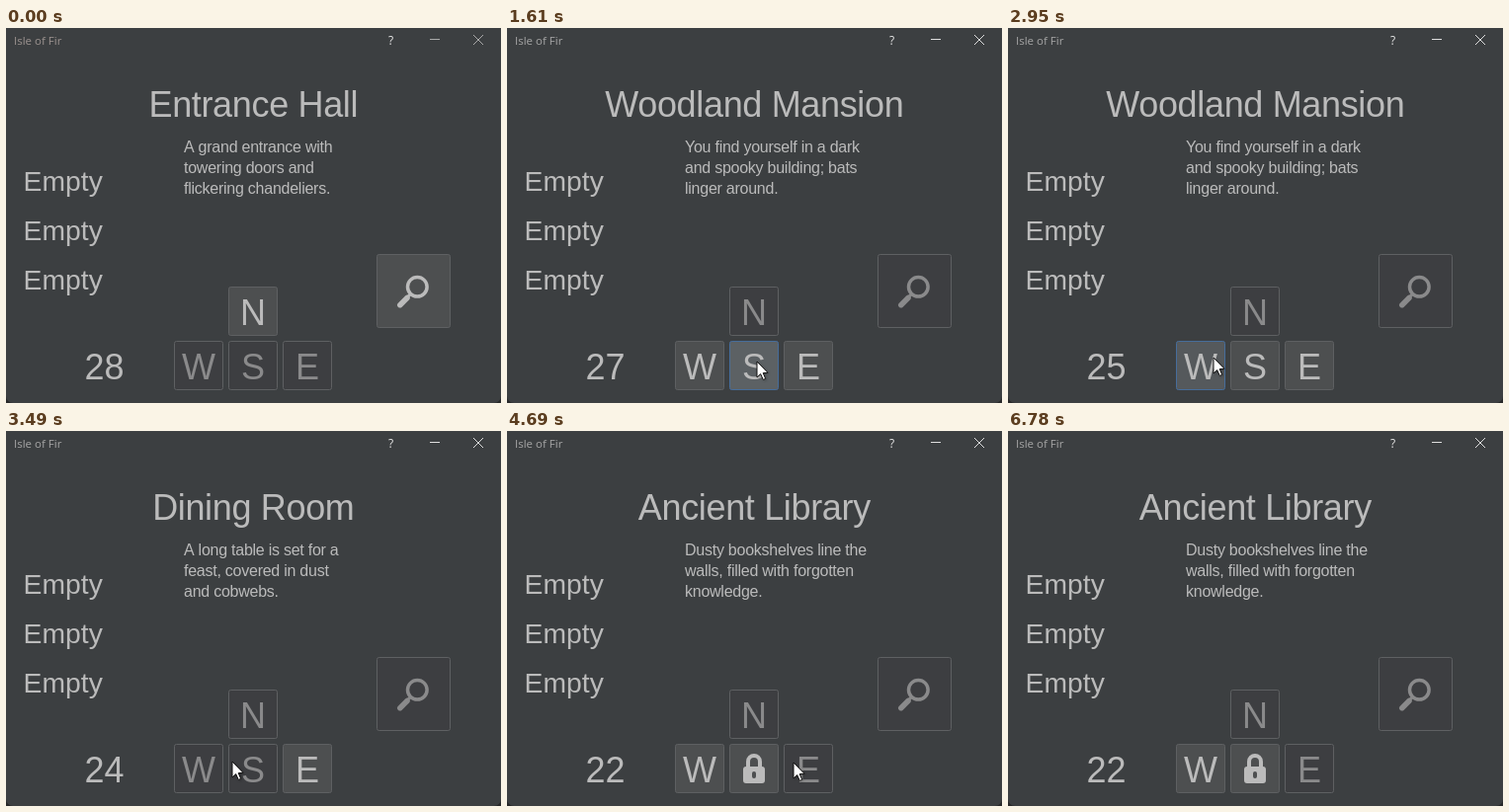
An HTML page with a canvas that plays this animation: 501x380 px, repeating every 6.97 s.

```html
<!DOCTYPE html>
<html lang="en">
<head>
<meta charset="utf-8">
<style>
  html, body { margin: 0; height: 100%; overflow: hidden; background: #262728; }
  canvas { display: block; }
</style>
</head>
<body>
<canvas id="stage" width="501" height="380"></canvas>
<script>
const ctx = document.getElementById('stage').getContext('2d');
const LOOP = 6970, STEP = 67;
const SANS = '"Liberation Sans", Arial, sans-serif';
const BAR = '"Open Sans", sans-serif';
const TEXT = '#bbbbbb', DIM = '#8a8a8b';

const hall = {
  title: 'Entrance Hall', exits: 'N', search: true,
  lines: ['A grand entrance with', 'towering doors and', 'flickering chandeliers.']
};
const mansion = {
  title: 'Woodland Mansion', exits: 'WSE',
  lines: ['You find yourself in a dark', 'and spooky building; bats', 'linger around.']
};
const dining = {
  title: 'Dining Room', exits: 'E',
  lines: ['A long table is set for a', 'feast, covered in dust', 'and cobwebs.']
};
const library = {
  title: 'Ancient Library', exits: 'WS', locked: 'S',
  lines: ['Dusty bookshelves line the', 'walls, filled with forgotten', 'knowledge.']
};

// Step at which each room is entered; every move costs one turn.
const visits = [[0, hall], [14, mansion], [25, hall], [38, mansion],
                [49, dining], [59, mansion], [70, library]];

// Pointer path: step, x, y.
const path = [
  [0, 390, 385], [1, 388, 372], [11, 260, 302], [15, 263, 299], [16, 263, 299],
  [22, 253, 338], [26, 253, 338], [31, 252, 291], [38, 252, 291], [44, 208, 334],
  [50, 208, 334], [56, 290, 336], [75, 290, 336], [77, 303, 330], [79, 296, 326],
  [81, 282, 333], [83, 282, 333], [84, 288, 331], [88, 430, 20], [90, 430, 20],
  [91, 430, -30], [94, 455, -20], [101, 456, 385]
];

const buttons = { N: [225, 262], W: [170, 317], S: [225, 317], E: [280, 317] };

function pointerAt(step) {
  const i = path.findIndex(p => p[0] > step);
  if (i < 0) return path[path.length - 1].slice(1);
  const [s0, x0, y0] = path[i - 1], [s1, x1, y1] = path[i];
  const u = (step - s0) / (s1 - s0), e = u * u * (3 - 2 * u);
  return [Math.round(x0 + (x1 - x0) * e), Math.round(y0 + (y1 - y0) * e)];
}

function text(str, x, y, size, { color = TEXT, align = 'left', family = SANS, spacing = 0 } = {}) {
  ctx.font = `${size}px ${family}`;
  ctx.letterSpacing = `${spacing}px`;
  ctx.textAlign = align;
  ctx.fillStyle = color;
  ctx.fillText(str, x, y);
}

function line(color, width, ...points) {
  ctx.strokeStyle = color;
  ctx.lineWidth = width;
  ctx.beginPath();
  points.forEach(([x, y]) => ctx.lineTo(x, y));
  ctx.stroke();
}

function roundBox(x, y, w, h, r, fill) {
  ctx.beginPath();
  ctx.roundRect(x, y, w, h, r);
  ctx.fillStyle = fill;
  ctx.fill();
}

function button(x, y, size, enabled, hover, pressed) {
  const fill = !enabled ? '#3d3e41' : pressed ? '#5c6164' : hover ? '#55595c' : '#4d4f50';
  roundBox(x + .5, y + .5, size - 1, size - 1, 2, fill);
  ctx.strokeStyle = hover ? '#466d9b' : '#5e6062';
  ctx.lineWidth = 1;
  ctx.stroke();
}

function magnifier(color) {
  line(color, 3, [410, 269], [405, 274]);
  ctx.lineCap = 'round';
  line(color, 5.5, [406, 273.5], [398.8, 280.7]);
  ctx.lineCap = 'butt';
  ctx.lineWidth = 3.5;
  ctx.beginPath();
  ctx.arc(416.3, 262.3, 9.8, 0, 7);
  ctx.stroke();
}

function padlock(x, y) {
  ctx.strokeStyle = TEXT;
  ctx.lineWidth = 4;
  ctx.beginPath();
  ctx.moveTo(x - 6, y + 15);
  ctx.arc(x, y + 8, 6, Math.PI, 0);
  ctx.lineTo(x + 6, y + 15);
  ctx.stroke();
  roundBox(x - 11, y + 13, 22, 17, 3, TEXT);
  roundBox(x - 2, y + 18, 4, 7, 2, '#4d4f50');
}

function titleBar(active, minimizeGlow) {
  ctx.fillStyle = `rgba(255,255,255,${.1 * minimizeGlow})`;
  ctx.fillRect(412, 0, 44, 25);
  const icon = active ? '#dedede' : '#a9a9a9';
  text('Isle of Fir', 8, 17, 11.5, { color: active ? '#a6a6a6' : '#9c9390', family: BAR });
  text('?', 389.5, 16.5, 12, { color: '#e6e6e6', align: 'center', family: BAR });
  line(icon, 1, [429, 11.5], [439, 11.5]);
  line(icon, 1, [473, 7], [483, 17]);
  line(icon, 1, [483, 7], [473, 17]);
}

function pointer(x, y) {
  ctx.save();
  ctx.translate(x, y);
  ctx.beginPath();
  [[0, 0], [0, 16], [3.7, 12.6], [6.3, 18.4], [8.7, 17.4], [6.2, 11.6], [11, 11.3]]
    .forEach(p => ctx.lineTo(...p));
  ctx.closePath();
  ctx.shadowColor = 'rgba(0,0,0,.35)';
  ctx.shadowBlur = 3;
  ctx.shadowOffsetX = ctx.shadowOffsetY = 1;
  ctx.fillStyle = '#fff';
  ctx.fill();
  ctx.shadowColor = 'transparent';
  ctx.strokeStyle = '#111';
  ctx.lineWidth = 1;
  ctx.stroke();
  ctx.restore();
}

function draw(now) {
  const step = Math.floor((now % LOOP + 4) / STEP);
  const turn = visits.filter(v => v[0] <= step).length - 1;
  const room = visits[turn][1];
  const pressing = turn + 1 < visits.length && visits[turn + 1][0] === step + 1;
  const [px, py] = pointerAt(step);
  const overMinimize = px >= 412 && px < 455 && py >= 0 && py < 25;

  ctx.clearRect(0, 0, 501, 380);
  roundBox(0, 0, 501, 380, [0, 0, 7, 7], '#3c3f41');
  titleBar(step >= 13, overMinimize ? 1 : step === 91 ? .5 : 0);

  text(room.title, 250.3, 90, 36, { align: 'center', spacing: -.34 });
  room.lines.forEach((str, i) => text(str, 180, 126 + 21 * i, 16, { spacing: -.25 }));
  for (const y of [165, 215, 265]) text('Empty', 17.6, y, 28.3);
  text(28 - turn, 79.5, 356, 36);

  button(375, 229, 75, room.search);
  magnifier(room.search ? TEXT : DIM);

  for (const [name, [x, y]] of Object.entries(buttons)) {
    const enabled = room.exits.includes(name);
    const hover = enabled && px >= x && px < x + 50 && py >= y && py < y + 50;
    button(x, y, 50, enabled, hover, hover && pressing);
    if (room.locked === name) padlock(x + 25, y + 10);
    else text(name, x + 25, y + 39, 36, { color: enabled ? TEXT : DIM, align: 'center' });
  }
  pointer(px, py);
}

const start = performance.now();
(function tick() {
  draw(performance.now() - start);
  requestAnimationFrame(tick);
})();
</script>
</body>
</html>
```
